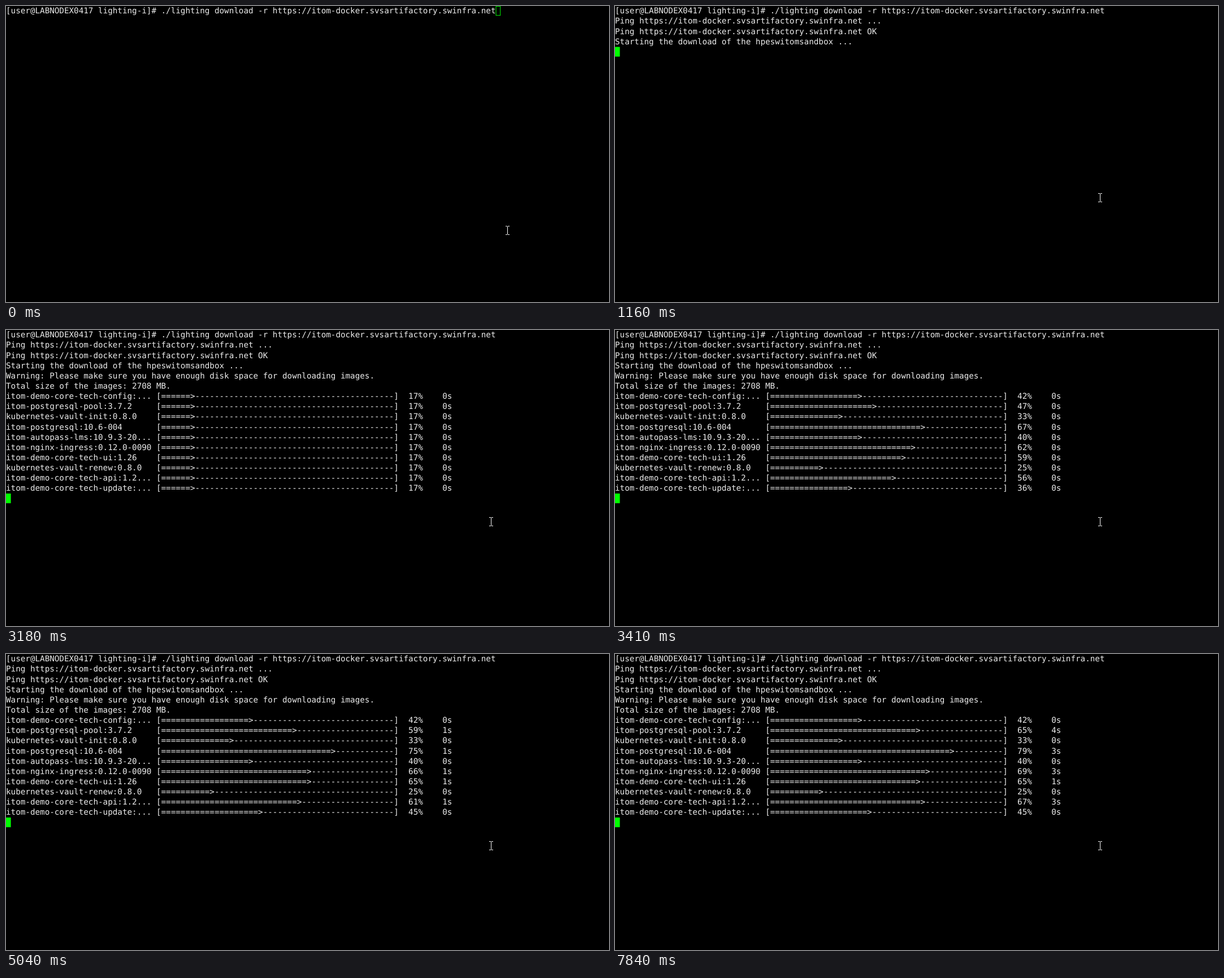
These frames come from a looping animation (1067x525 px, 8 s). An HTML page:

```html
<!DOCTYPE html>
<html lang="en">
<head>
<meta charset="utf-8">
<title>Terminal download</title>
<style>
  html, body { margin: 0; width: 100%; height: 100%; overflow: hidden; background: #000; }
  svg { display: block; width: 100%; height: 100%; }
  text {
    font: 14.25px "DejaVu Sans Mono", monospace;
    font-variant-ligatures: none;
    text-rendering: geometricPrecision;
    white-space: pre;
    fill: #ececec;
  }
</style>
</head>
<body>
<svg viewBox="0 0 1067 525">
  <rect width="1067" height="525"/>
  <g id="screen"></g>
  <rect id="caret" width="7.6" height="16.2" stroke="#0f0" stroke-width=".95"/>
  <path id="mouse" d="M-3.5 -7.5H-.5M.5 -7.5H3.5M0 -7V7M-3.5 7.5H-.5M.5 7.5H3.5" fill="none" stroke="#fff"/>
</svg>
<script>
const LOOP = 8000, CELL = 8.58, ROW = 18.13, BASELINE = 13.36, BAR = 48;
const ENTER = 470, LIST = 2010, FETCH = 3180;
const url = 'https://itom-docker.svsartifactory.swinfra.net';
const prompt = `[user@LABNODEX0417 lighting-i]# ./lighting download -r ${url}`;

const header = [
  { at: 0, text: prompt },
  { at: 530, text: `Ping ${url} ...` },
  { at: 1160, text: `Ping ${url} OK` },
  { at: 1160, text: 'Starting the download of the hpeswitomsandbox ...' },
  { at: LIST, text: 'Warning: Please make sure you have enough disk space for downloading images.' },
  { at: LIST, text: 'Total size of the images: 2708 MB.' }
];

// Each image fills quickly to `base` percent, then gains `chunk` percent at every arrival.
const image = (name, base, chunk = 0, ...arrivals) => ({ name, base, chunk, arrivals });
const images = [
  image('itom-demo-core-tech-config:...', 42),
  image('itom-postgresql-pool:3.7.2', 47, 6, 3500, 5040, 7840),
  image('kubernetes-vault-init:0.8.0', 33),
  image('itom-postgresql:10.6-004', 67, 4, 3500, 4510, 6370),
  image('itom-autopass-lms:10.9.3-20...', 40),
  image('itom-nginx-ingress:0.12.0-0090', 62.45, 3.5, 4350, 6370),
  image('itom-demo-core-tech-ui:1.26', 59, 3, 3500, 4510),
  image('kubernetes-vault-renew:0.8.0', 25),
  image('itom-demo-core-tech-api:1.2...', 55.9, 5.5, 4350, 6220),
  image('itom-demo-core-tech-update:...', 36, 9, 3570)
];

const $ = id => document.getElementById(id);
const set = (el, attrs) => { for (const k in attrs) el.setAttribute(k, attrs[k]); };
// Number of ticks passed since `from`, counting the first one.
const ticks = (t, from, gap, max) => Math.max(0, Math.min(max, Math.floor((t - from) / gap) + 1));

const lines = Array.from({ length: header.length + images.length }, (_, i) => {
  const el = document.createElementNS('http://www.w3.org/2000/svg', 'text');
  set(el, { x: 0, y: BASELINE + i * ROW });
  return $('screen').appendChild(el);
});

function progress({ name, base, chunk, arrivals }, t) {
  const got = arrivals.filter(a => a <= t);
  const pct = Math.min(base, 17 * ticks(t, FETCH, 76, 4)) + chunk * got.length;
  const sec = Math.floor(((got.pop() || FETCH) - FETCH) / 1000);
  const done = pct ? '='.repeat(Math.round(.49 * pct - 2.1)) + '>' : '';
  const share = `${Math.round(pct)}%`.padStart(5);
  const time = (pct ? `${sec}s` : '---').padStart(6);
  return `${name.padEnd(31)}[${done.padEnd(BAR, '-')}]${share}${time}`;
}

function draw(t) {
  const text = header.filter(h => h.at <= t).map(h => h.text);
  if (t >= LIST) text.push(...images.map(img => progress(img, t)));
  lines.forEach((el, i) => {
    const s = text[i] || '';
    if (el.textContent !== s) el.textContent = s;
  });

  const typing = t < ENTER;
  set($('caret'), {
    x: (typing ? prompt.length * CELL : 0) + .48,
    y: (typing ? 0 : text.length * ROW) + .48,
    fill: t < 290 ? 'none' : '#0f0'
  });

  // The pointer swings up and left in four hops.
  const k = ticks(t, 70, 73.3, 4) / 4;
  const x = 887.5 - 29 * k - 27 * Math.sin(Math.PI * k);
  const y = 398 - 58 * Math.sin(Math.PI / 2 * k);
  set($('mouse'), { transform: `translate(${x} ${y})` });
}

const start = performance.now();
function tick() {
  draw((performance.now() - start) % LOOP);
  requestAnimationFrame(tick);
}
tick();
</script>
</body>
</html>
```
